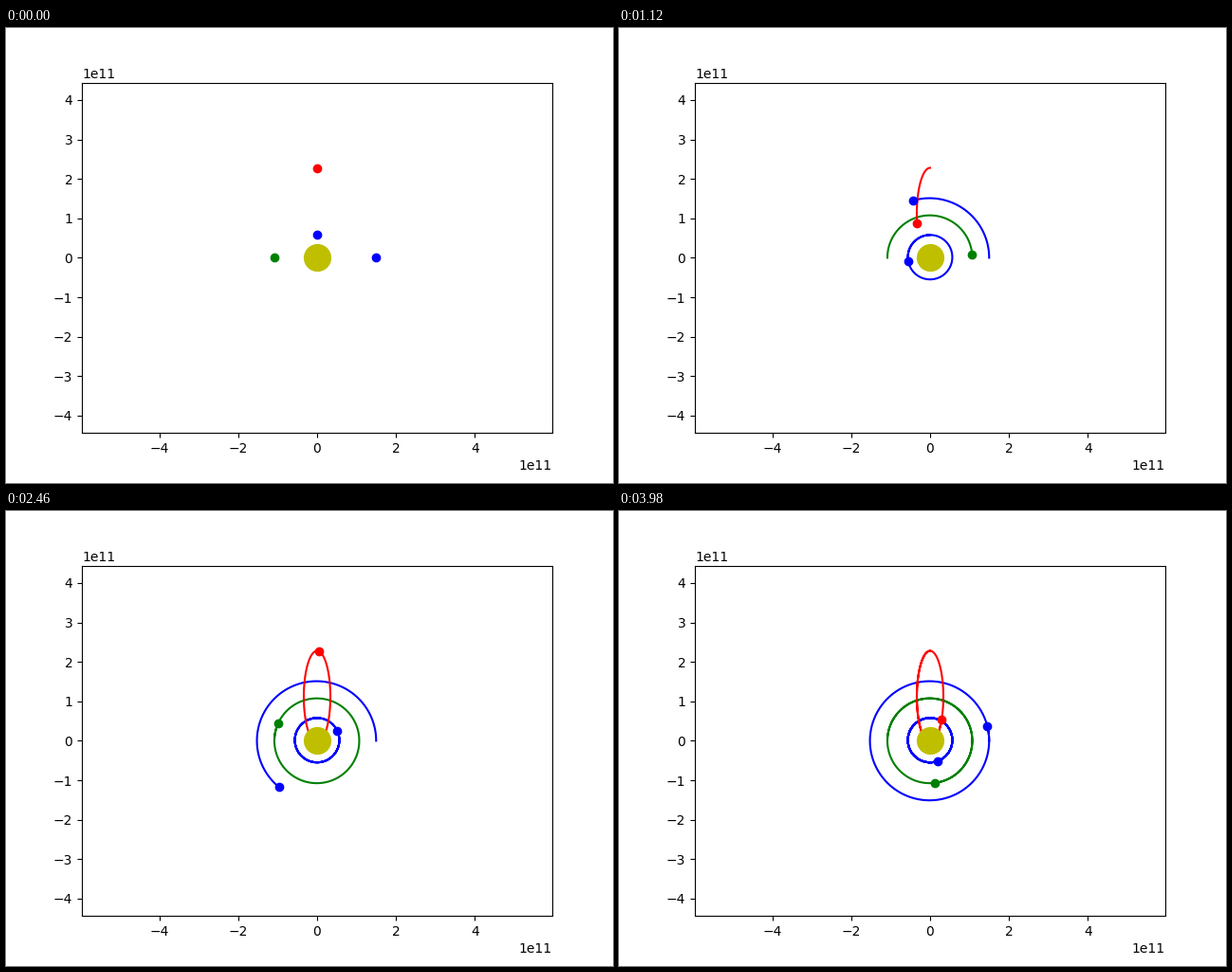
These frames come from a looping animation (640x480 px, 4 s). A matplotlib script:

```python
import numpy as np
import matplotlib.pyplot as plt
from matplotlib.animation import FuncAnimation

GM = 6.67e-11 * 2e30
STEP = 1e8 / 600
FRAMES = 200

# start distance (m), start speed (m/s), start direction, turning sense, colour
PLANETS = [
    (5.79e10, 47360, 1j, 1, "b"),
    (1.082e11, 35000, -1, -1, "g"),
    (1.496e11, 30000, 1, 1, "b"),
    (2.279e11, 5000, 1j, 1, "r"),
]


def orbit(r, v, start, sense, t):
    """Kepler orbit leaving an apsis; e is negative when that is the far one."""
    e = v**2 * r / GM - 1
    a = r / (1 - e)
    mean = np.sqrt(GM / a**3) * t
    lo, hi = mean - 1, mean + 1
    for _ in range(50):
        mid = (lo + hi) / 2
        low = mid - e * np.sin(mid) < mean
        lo, hi = np.where(low, mid, lo), np.where(low, hi, mid)
    x = a * (np.cos(lo) - e)
    y = a * np.sqrt(1 - e**2) * np.sin(lo)
    return (x + 1j * sense * y) * start


t = np.arange(FRAMES) * STEP
paths = [orbit(r, v, start, sense, t) for r, v, start, sense, _ in PLANETS]
colors = [p[-1] for p in PLANETS]

fig, ax = plt.subplots(figsize=(6.4, 4.8), dpi=100)
half = 4.44e11
ax.set_ylim(-half, half)
ax.set_xlim(-half * 496 / 369.6, half * 496 / 369.6)

trails = [ax.plot([], [], color=c, lw=1.5)[0] for c in colors]
ax.plot([0], [0], "yo", ms=20)
dots = [ax.plot([], [], "o", color=c, ms=6)[0] for c in colors]


def update(i):
    for path, trail, dot in zip(paths, trails, dots):
        trail.set_data(path.real[:i + 1], path.imag[:i + 1])
        dot.set_data([path.real[i]], [path.imag[i]])
    return trails + dots


anim = FuncAnimation(fig, update, frames=FRAMES, interval=20, repeat=True)
plt.show()
```
